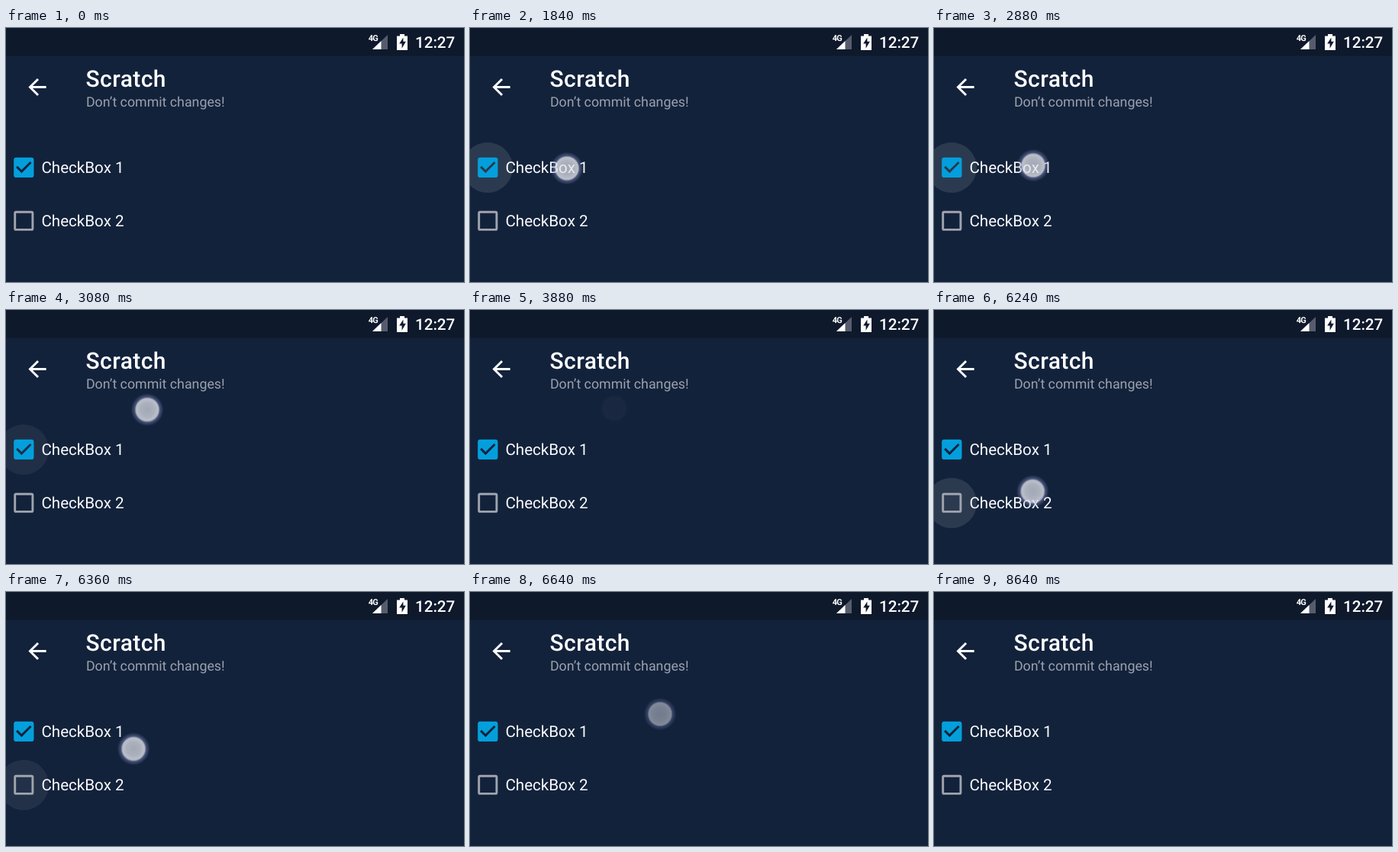
Write an HTML page that moves like this. It is 600 by 333 pixels and loops after 9040 ms.

```html
<!DOCTYPE html>
<html lang="en">
<head>
<meta charset="utf-8">
<title>Checkbox touch feedback</title>
<style>
  html, body { margin: 0; width: 100%; height: 100%; overflow: hidden; background: #13223b; }
  .stage { position: relative; width: 600px; height: 333px; overflow: hidden; }
  svg { position: absolute; inset: 0; display: block; }
  text { font-family: Roboto, sans-serif; fill: #fff; text-rendering: geometricPrecision; }
  .title { font-size: 30px; font-weight: 500; letter-spacing: .4px; }
  .subtitle { font-size: 17.8px; fill: #9ba1ad; }
  .label { font-size: 20.6px; fill: #fafbfc; }
  .clock { font-size: 20.6px; font-weight: 500; }
  .net { font-size: 11px; font-weight: 700; letter-spacing: -.8px; }

  .ripple {
    fill: #fff; fill-opacity: .11; opacity: 0;
    transform-box: fill-box; transform-origin: center;
    animation: 9040ms linear infinite;
  }
  .r1 { animation-name: ripple1; }
  .r2 { animation-name: ripple2; }

  .touch {
    position: absolute; left: 0; top: 0; width: 44px; height: 44px; opacity: 0;
    background: radial-gradient(circle 22px,
      rgba(225,227,234,.7) 0, rgba(225,227,234,.74) 9px, rgba(225,227,234,.82) 14px,
      rgba(215,218,232,.76) 15px, rgba(140,148,200,.45) 16.4px, rgba(110,120,180,0) 21.5px);
    offset-rotate: 0deg;
    animation: 9040ms linear infinite;
  }
  .t1 { offset-path: path("M127 184 Q160 140 189 129"); animation-name: show1, drag1; }
  .t2 { offset-path: path("M117 254 Q143 210 249 160"); animation-name: show2, drag2; }

  @keyframes ripple1 {
    0%, 15.04% { opacity: 0; transform: scale(.2); animation-timing-function: ease-out; }
    20.35%, 32.74% { opacity: 1; transform: none; }
    35.84%, 100% { opacity: 0; transform: none; }
  }
  @keyframes ripple2 {
    0%, 46.46% { opacity: 0; transform: scale(.2); animation-timing-function: ease-out; }
    50.88%, 69.25% { opacity: 1; transform: none; }
    72.57%, 100% { opacity: 0; transform: none; }
  }
  @keyframes show1 {
    0%, 14.16% { opacity: 0; }
    14.6%, 35.4% { opacity: 1; }
    37.61%, 46.02% { opacity: .04; }
    46.1%, 100% { opacity: 0; }
  }
  @keyframes show2 {
    0%, 46.02% { opacity: 0; }
    46.46%, 72.79% { opacity: 1; }
    74.78%, 100% { opacity: 0; }
  }
  @keyframes drag1 {
    0%, 31.42% { offset-distance: 0%; animation-timing-function: cubic-bezier(.333, 0, .667, 1); }
    34.51%, 100% { offset-distance: 100%; }
  }
  @keyframes drag2 {
    0%, 67.7% { offset-distance: 0%; animation-timing-function: cubic-bezier(.36, 0, .667, 1); }
    73.45%, 100% { offset-distance: 100%; }
  }
</style>
</head>
<body>
<div class="stage">
  <svg width="600" height="333" viewBox="0 0 600 333">
    <rect width="600" height="333" fill="#13223b"/>
    <rect width="600" height="36.7" fill="#0f192c"/>

    <!-- status bar -->
    <text class="net" x="474.7" y="16.5">4G</text>
    <path d="M500 9V28H480Z" fill="#555d6c"/>
    <path d="M491.5 17V28H480Z" fill="#fff"/>
    <path d="M516 8h6v2.5h4V29h-14V10.5h4Z" fill="#fff"/>
    <path d="M520.4 12.5v5.3h3.4l-5.2 9v-6.3h-3.4Z" fill="#0f192c"/>
    <text class="clock" x="536" y="26">12:27</text>

    <!-- toolbar -->
    <path transform="translate(23.6 60.1) scale(1.45)" fill="#fff"
      d="M20 11H7.83l5.59-5.59L12 4l-8 8 8 8 1.41-1.41L7.83 13H20z"/>
    <text class="title" x="104.5" y="76.5">Scratch</text>
    <text class="subtitle" x="104.9" y="102.7">Don’t commit changes!</text>

    <!-- rows -->
    <circle class="ripple r1" cx="23" cy="183" r="33"/>
    <circle class="ripple r2" cx="23" cy="253" r="33"/>
    <path transform="translate(5.8 165.4) scale(1.46)" fill="#039fdc"
      d="M19 3H5c-1.11 0-2 .9-2 2v14c0 1.1.89 2 2 2h14c1.11 0 2-.9 2-2V5c0-1.1-.89-2-2-2zm-9 14l-5-5 1.41-1.41L10 14.17l7.59-7.59L19 8z"/>
    <rect x="11.7" y="241.2" width="23.2" height="23.2" rx="1.5" fill="none" stroke="#9fa4ae" stroke-width="2.9"/>
    <text class="label" x="46.4" y="190.2">CheckBox 1</text>
    <text class="label" x="46.4" y="260.2">CheckBox 2</text>
  </svg>
  <div class="touch t1"></div>
  <div class="touch t2"></div>
</div>
</body>
</html>
```
